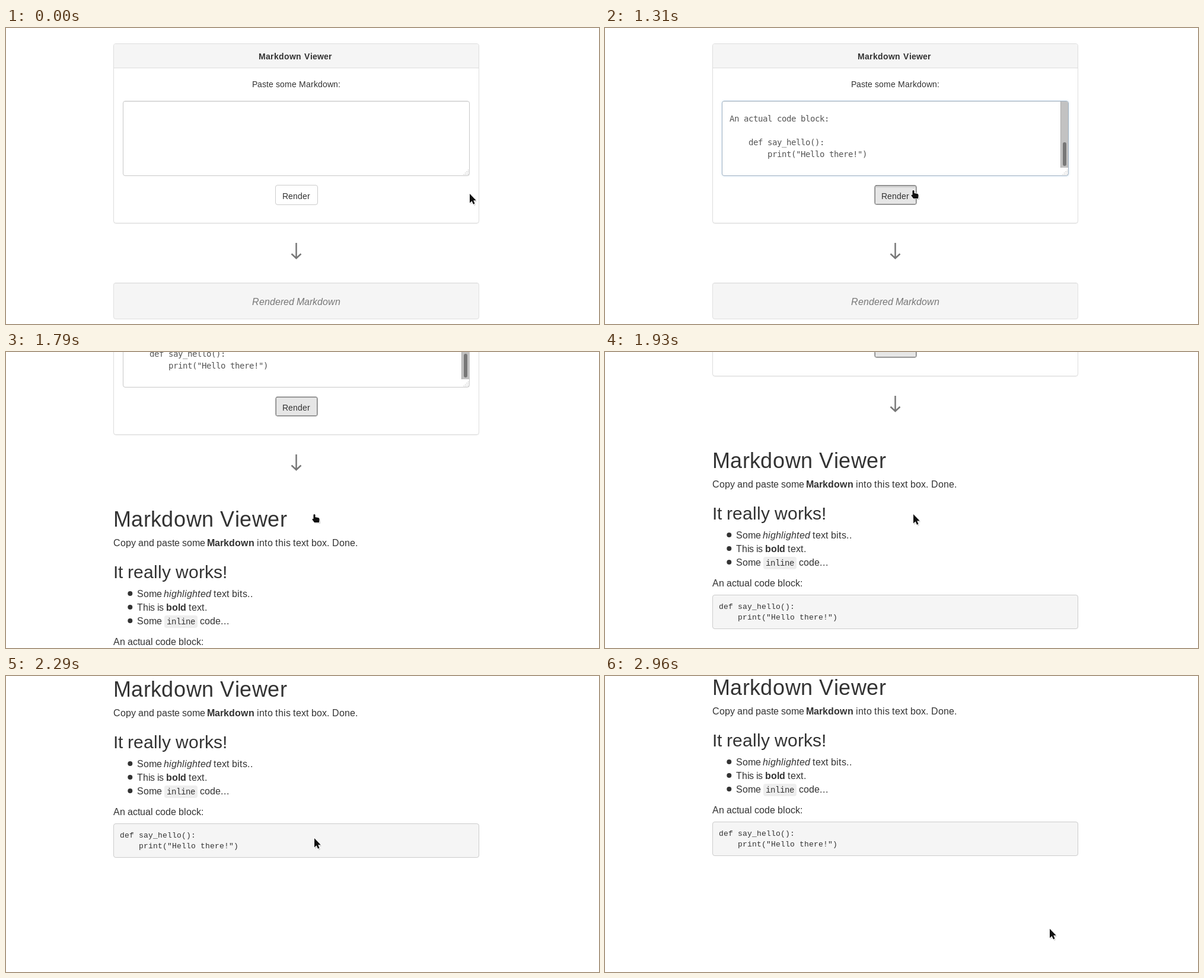
An HTML page that plays this animation: 1000x500 px, repeating every 4.8 s.

```html
<!DOCTYPE html>
<html lang="en">
<head>
<meta charset="utf-8">
<title>Markdown Viewer</title>
<style>
  html, body { margin: 0; width: 100%; height: 100%; overflow: hidden; background: #fff; }
  svg { display: block; width: 100%; height: 100%; }
  #area { fill: #fff; }
  .well { fill: #f5f5f5; }
</style>
</head>
<body>
<svg viewBox="0 0 1000 500">
  <g id="page">
    <rect x="181.5" y="27.5" width="616" height="303" rx="4" fill="none" stroke="#000" stroke-opacity=".06"/>
    <rect x="181.5" y="26.5" width="616" height="303" rx="3.5" fill="#fff" stroke="#ddd"/>
    <path d="M182 67V30q0-3 3-3H794q3 0 3 3V67Z" class="well"/>
    <path d="M182 67.5H797" stroke="#ddd"/>

    <g id="glow" fill="none" stroke="#66afe9">
      <rect x="196.5" y="122.5" width="586" height="128" rx="4.5" stroke-opacity=".22"/>
      <rect x="195.5" y="121.5" width="588" height="130" rx="5.5" stroke-opacity=".12"/>
      <rect x="194.5" y="120.5" width="590" height="132" rx="6.5" stroke-opacity=".05"/>
    </g>
    <rect id="area" x="197.5" y="123.5" width="584" height="126" rx="3.5"/>
    <path d="M200 124.5H779" stroke="#000" stroke-opacity=".07"/>
    <g id="pasted">
      <path d="M768 124H778q3 0 3 3V236H768Z" fill="#c2c2c2"/>
      <path d="M768.5 124V236" stroke="#aaa"/>
      <rect x="772" y="193" width="6" height="40" rx="3" fill="#777"/>
    </g>
    <path id="grip" stroke="#aaa" stroke-dasharray="1 1.5"/>
    <path id="caret" stroke="#333"/>

    <g id="button">
      <rect id="face" x="454.5" y="265.5" width="71" height="33" rx="3.5"/>
      <path id="dent" d="M456 267.5H524M456 269H524" stroke="#000" stroke-opacity=".07" stroke-width="2"/>
      <rect id="ring" x="455.5" y="266.5" width="69" height="31" rx="2" fill="none" stroke="#222" stroke-dasharray="1 1"/>
    </g>

    <path d="M489.5 363V388M481.5 381.5L489.5 389L497.5 381.5" fill="none" stroke="#777" stroke-width="2.5"/>

    <g id="empty">
      <rect x="181.5" y="430.5" width="616" height="61" rx="3.5" class="well" stroke="#e0e0e0"/>
      <path d="M184 431.5H795" stroke="#000" stroke-opacity=".05"/>
    </g>
    <g id="result">
      <g fill="#333">
        <circle cx="209.3" cy="598" r="4"/>
        <circle cx="209.3" cy="621" r="4"/>
        <circle cx="209.3" cy="644" r="4"/>
      </g>
      <rect x="267" y="635" width="56" height="21" rx="4" fill="#eee"/>
      <rect x="181.5" y="699.5" width="616" height="57" rx="3.5" class="well" stroke="#ccc"/>
    </g>
    <g id="labels"></g>
  </g>

  <g id="arrow">
    <path d="M1.5 3V18L5 15L7.5 20L10 19L8 14L12.5 13Z" fill="#000" opacity=".18"/>
    <path d="M0 0V15.5L3.6 12.3L6 17.8L8.6 16.6L6.2 11.3H10.8Z" fill="#111" stroke="#fff" stroke-width="2" paint-order="stroke"/>
  </g>
  <g id="beam" fill="none">
    <path d="M-3 -6.5H3M-3 6.5H3M0 -6.5V6.5" stroke="#fff" stroke-width="3"/>
    <path d="M-3 -6.5H-1L0 -5.5L1 -6.5H3M-3 6.5H-1L0 5.5L1 6.5H3M0 -5.5V5.5" stroke="#111" stroke-width="1.3"/>
  </g>
  <g id="hand">
    <path d="M-2 2H2V7L9 8Q11 9 10 16H1L-4 10Z" fill="#000" opacity=".18"/>
    <path d="M-1.5 1Q0 -.8 1.5 1V5L7 6Q8.6 6.6 8.6 9L8 14H0L-3.6 9Q-3.4 7 -1.5 8Z" fill="#111" stroke="#fff" stroke-width="2" paint-order="stroke"/>
  </g>
</svg>
<script>
const LOOP = 4800;
const $ = id => document.getElementById(id);
const pen = document.createElement('canvas').getContext('2d');

const SANS = '"Liberation Sans", Arial, sans-serif';
const CODE = '"Liberation Mono", "Courier New", monospace';
const INPUT = '"DejaVu Sans Mono", monospace';

// Whole-pixel glyph advances, as in hinted text; bias shifts the rounding.
function label(parent, str, x, y, font, fill = '#333', bias = 0) {
  const node = document.createElementNS('http://www.w3.org/2000/svg', 'text');
  const xs = [];
  pen.font = font;
  for (const ch of str) {
    xs.push(x);
    x += Math.round(pen.measureText(ch).width + (ch === ' ' ? 0 : bias));
  }
  node.setAttribute('x', xs.join(' '));
  node.setAttribute('y', y);
  node.setAttribute('fill', fill);
  node.style.font = font;
  node.textContent = str;
  $(parent).append(node);
}

const body = '16px ' + SANS, bold = 'bold ' + body, slanted = 'italic ' + body;
const small = '14px ' + SANS, title = 'bold ' + small;
const input = '14px ' + INPUT, pre = '13px ' + CODE;

label('labels', 'Markdown', 426, 53, title, '#333', .25);
label('labels', 'Viewer', 503, 53, title, '#333', .25);
label('labels', 'Paste some Markdown:', 415, 100, small);
label('button', 'Render', 466, 289, small);
label('empty', 'Rendered Markdown', 415, 468, slanted, '#777');

label('pasted', 'An actual code block:', 210, 158, input, '#555');
label('pasted', 'def say_hello():', 242, 198, input, '#555');
label('pasted', 'print("Hello there!")', 274, 218, input, '#555');

label('result', 'Markdown Viewer', 181, 485, '36px ' + SANS, '#333', .49);
label('result', 'Copy and paste some', 181, 518, body);
label('result', 'Markdown', 339, 518, bold, '#333', .06);
label('result', 'into this text box.', 423, 518, body, '#333', .06);
label('result', 'Done.', 550, 518, body);
label('result', 'It really works!', 181, 572, '30px ' + SANS);
label('result', 'Some', 221, 604, body);
label('result', 'highlighted', 266, 604, slanted, '#333', .06);
label('result', 'text bits..', 350, 604, body, '#333', .06);
label('result', 'This is', 221, 627, body, '#333', -.1);
label('result', 'bold', 270, 627, bold);
label('result', 'text.', 308, 627, body, '#333', .06);
label('result', 'Some', 221, 650, body);
label('result', 'inline', 271, 650, '14px ' + CODE);
label('result', 'code...', 327, 650, body, '#333', .06);
label('result', 'An actual code block:', 181, 685, body);
label('result', 'def say_hello():', 192, 723, pre);
label('result', 'print("Hello there!")', 224, 741, pre);

$('grip').setAttribute('d', [0, 1, 2, 3].map(i => `M${779.5 - i * 2.5} 248V${239 + i * 2.5}`).join(''));

const clamp = v => Math.min(1, Math.max(0, v));
const ramp = (t, a, b) => clamp((t - a) / (b - a));
const swing = p => .5 - Math.cos(Math.PI * p) / 2;
const mix = (a, b, p) => a + (b - a) * p;
const show = (id, on) => { $(id).style.display = on ? '' : 'none'; };
const rgb = (a, b, p) => `rgb(${a.map((v, i) => Math.round(mix(v, b[i], p)))})`;

// time, x, y
const PATH = [
  [0, 782, 280], [40, 780, 280], [240, 714, 262], [420, 663, 245],
  [700, 663, 245], [880, 596, 262], [1080, 520, 274], [2380, 520, 274],
  [2600, 600, 326], [2840, 700, 397], [2960, 750, 427], [LOOP, 750, 427]
];

function pointer(t) {
  const i = Math.max(1, PATH.findIndex(p => p[0] > t));
  const [a, b] = [PATH[i - 1], PATH[i]];
  const p = ramp(t, a[0], b[0]);
  return [1, 2].map(k => Math.round(mix(a[k], b[k], p)));
}

const FOCUS = 500, PASTE = 590, PRESS = 1210, RENDER = 1342;

function draw(t) {
  const scroll = Math.round(453 * swing(ramp(t, RENDER, RENDER + 1000)));
  $('page').setAttribute('transform', `translate(0 ${-scroll})`);

  const focus = ramp(t, FOCUS, FOCUS + 190) * (1 - ramp(t, PRESS, PRESS + 190));
  $('glow').style.opacity = focus;
  $('area').style.stroke = rgb([200, 200, 200], [112, 150, 184], focus);

  const pasted = t >= PASTE;
  show('pasted', pasted);
  show('caret', t >= FOCUS && t < PRESS && (t < PASTE + 500));
  $('caret').setAttribute('d', pasted ? 'M210.5 225V241' : 'M210.5 130V146');

  const [x, y] = pointer(t);
  const overButton = x < 526 && y > 264 && t < RENDER;
  const pressed = t >= PRESS;
  const lit = overButton || pressed;
  $('face').style.fill = lit ? '#e6e6e6' : '#fff';
  $('face').style.stroke = lit ? '#adadad' : '#ccc';
  show('ring', pressed);
  show('dent', pressed && t < RENDER);
  show('empty', t < RENDER);
  show('result', t >= RENDER);

  const inArea = x < 782 && y < 250 && t < PRESS;
  const kind = inArea ? 'beam' : overButton || (pressed && t < 1850) ? 'hand' : 'arrow';
  for (const id of ['arrow', 'beam', 'hand']) show(id, id === kind);
  $(kind).setAttribute('transform', `translate(${x} ${y})`);
}

const start = performance.now();
function tick() {
  draw((performance.now() - start) % LOOP);
  requestAnimationFrame(tick);
}
tick();
</script>
</body>
</html>
```
